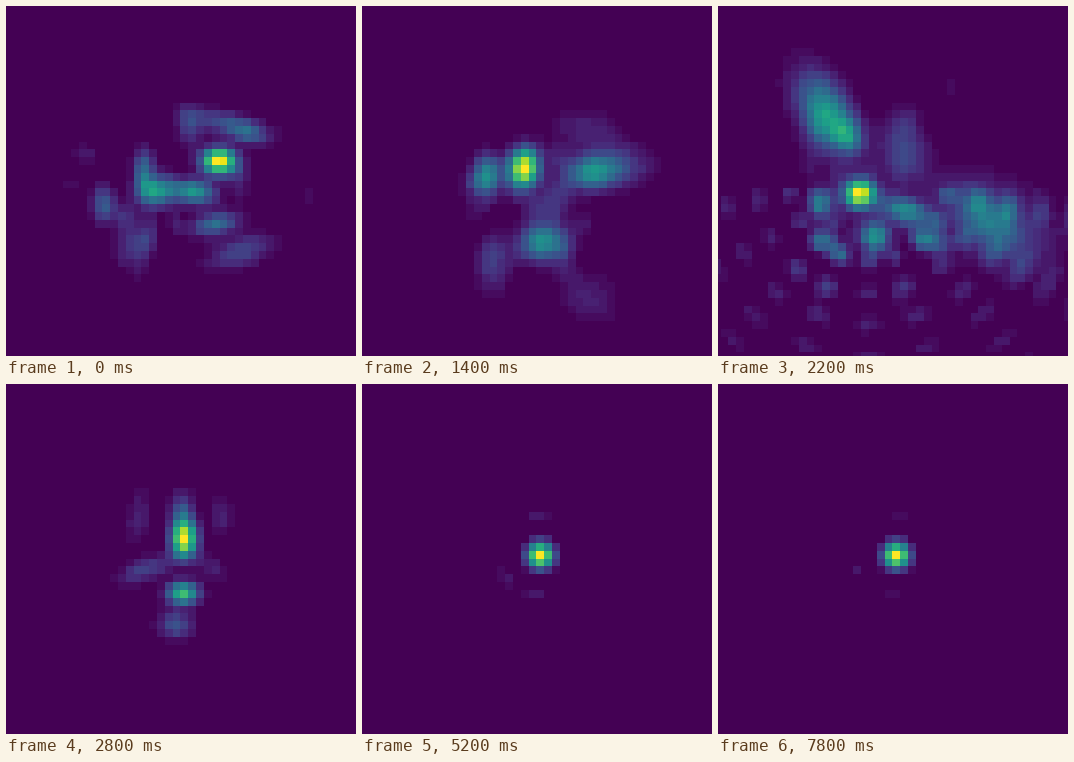
Write a matplotlib script that moves like this. It is 350 px wide and 350 px high and loops after 8 s.

```python
import numpy as np
import matplotlib.pyplot as plt
from matplotlib.animation import FuncAnimation

SIZE, CELL, N = 350, 7.81, 46
FRAMES, STEP, SETTLE, CALM = 40, 200, 14, 20
X0, Y0 = 174.48 - 23 * CELL, 174.68 - 23 * CELL
FLOOR, LEVELS = 0.03, 32

mid = (np.arange(N) + 0.5) * CELL
X, Y = np.meshgrid(X0 + mid, Y0 + mid)
pix = np.arange(SIZE) + 0.5
CELLS = np.ix_(((pix - Y0) // CELL).astype(int), ((pix - X0) // CELL).astype(int))

# Main lights: x, y, two radii, tilt in degrees, brightness; the peak comes first.
WIDE = [
    (213, 155, 12, 9, 0, 1), (225, 119, 30, 9, 14, .28),
    (242, 128, 12, 7, 20, .17), (150, 186, 12, 10, 0, .5),
    (138, 166, 8, 17, 0, .36), (188, 186, 15, 9, 8, .53),
    (209, 218, 17, 8, -12, .38), (234, 246, 25, 11, -18, .24),
    (97, 198, 8, 13, 0, .32), (136, 238, 10, 12, 0, .22),
]
SPLIT = [
    (162, 162, 11, 14, 8, 1), (125, 170, 10, 15, 0, .52),
    (230, 168, 14, 12, -15, .42), (252, 160, 30, 14, 0, .23),
    (225, 122, 28, 14, 10, .14), (182, 235, 14, 13, 15, .4),
    (190, 198, 11, 16, 0, .18), (133, 262, 13, 24, 5, .15),
    (226, 292, 26, 20, 30, .13),
]
SPREAD = [
    (141, 188, 11, 10, 0, 1), (111, 108, 27, 16, 60, .42),
    (130, 130, 12, 10, 60, .35), (100, 102, 40, 21, 68, .16),
    (186, 143, 16, 22, -25, .25), (102, 197, 9, 10, 0, .48),
    (186, 204, 18, 9, 15, .5), (156, 229, 12, 11, 0, .48),
    (212, 233, 14, 9, 30, .38), (267, 212, 29, 15, 40, .3),
    (284, 220, 48, 34, 35, .18), (112, 240, 15, 8, 35, .32),
]
STACK = [
    (178, 155, 9, 13, 0, 1), (176, 127, 9, 14, 0, .28),
    (177, 209, 11, 8, 0, .74), (170, 241, 13, 10, 10, .3),
    (140, 186, 22, 8, -20, .24), (206, 184, 15, 9, 40, .13),
    (133, 134, 10, 22, 8, .14), (216, 132, 9, 17, 0, .14),
]
CORE = [(178.3, 171.5, 9.4, 9.4, 0, 1)]
STATES = [WIDE, SPLIT, SPREAD, STACK, CORE]
TIMES = [0, 7, 11, SETTLE, CALM]


def spot(x, y, a, b, tilt, amp):
    t = np.radians(tilt)
    dx, dy = X - x, Y - y
    u = dx * np.cos(t) + dy * np.sin(t)
    v = dy * np.cos(t) - dx * np.sin(t)
    return amp * np.exp(-(u / a) ** 2 / 2 - (v / b) ** 2 / 2)


def haze(i):
    """Faint seeded streaks around the peak before the loop settles."""
    rng = np.random.default_rng(40 + i)
    spread = np.interp(i, [11, SETTLE], [1, .5])
    total = np.zeros((N, N))
    for _ in range(14):
        x, y = rng.normal((160, 200), (70 * spread, 48 * spread))
        a, b = rng.uniform(6, 10), rng.uniform(8, 16)
        total += spot(x, y, a, b, rng.uniform(-15, 15), rng.uniform(.07, .12))
    return total


def fan(gain):
    """Ripples fanning out below the peak: rays crossed with rings."""
    dx, dy = X - 150, Y - 175
    r, angle = np.hypot(dx, dy), np.arctan2(dy, dx)
    rays = np.sin(9 * angle) ** 2
    rings = np.sin(np.pi * r / 32) ** 2
    reach = np.clip((r - 50) / 20, 0, 1) * np.exp(-r / 250)
    return gain * rays * rings * reach * (dy > 0)


def ring(i):
    """Three arcs of the first diffraction ring, flickering and fading."""
    rng = np.random.default_rng(i)
    length = np.interp(i, [CALM, 32], [14, 7])
    amp = np.interp(i, [SETTLE, CALM, 32], [0, .14, .1])
    total = np.zeros((N, N))
    for angle in (-85, 155, 95):
        t = np.radians(angle + rng.normal(0, 3))
        total += spot(178 + 40 * np.cos(t), 171 + 40 * np.sin(t),
                      length, 5, np.degrees(t) + 90, amp)
    return total


def field(i):
    k = min(np.searchsorted(TIMES, i, side="right"), len(TIMES) - 1)
    old, new = STATES[k - 1], STATES[k]
    u = min((i - TIMES[k - 1]) / (TIMES[k] - TIMES[k - 1]), 1)
    w = 1 - (1 - u) ** 3 if i >= SETTLE else u
    peak = [p + (q - p) * w for p, q in zip(old[0], new[0])]
    img = spot(*peak)
    img += (1 - w) * sum(spot(*s) for s in old[1:])
    img += w * sum(spot(*s) for s in new[1:])
    if i < SETTLE:
        img += haze(i) + fan(np.interp(i, [7, 11, SETTLE], [0, .24, 0]))
    else:
        img += ring(i)
    img = np.clip((img - FLOOR) / (img.max() - FLOOR), 0, 1)
    return (np.floor(img * LEVELS + 1e-9) / LEVELS)[CELLS]


fig = plt.figure(figsize=(3.5, 3.5), dpi=100)
ax = fig.add_axes([0, 0, 1, 1])
ax.axis("off")
view = ax.imshow(field(0), cmap="viridis", vmin=0, vmax=1,
                 interpolation="nearest", aspect="auto")


def draw(i):
    view.set_data(field(i))
    return [view]


anim = FuncAnimation(fig, draw, frames=FRAMES, interval=STEP,
                     repeat=True, repeat_delay=0)
plt.show()
```
